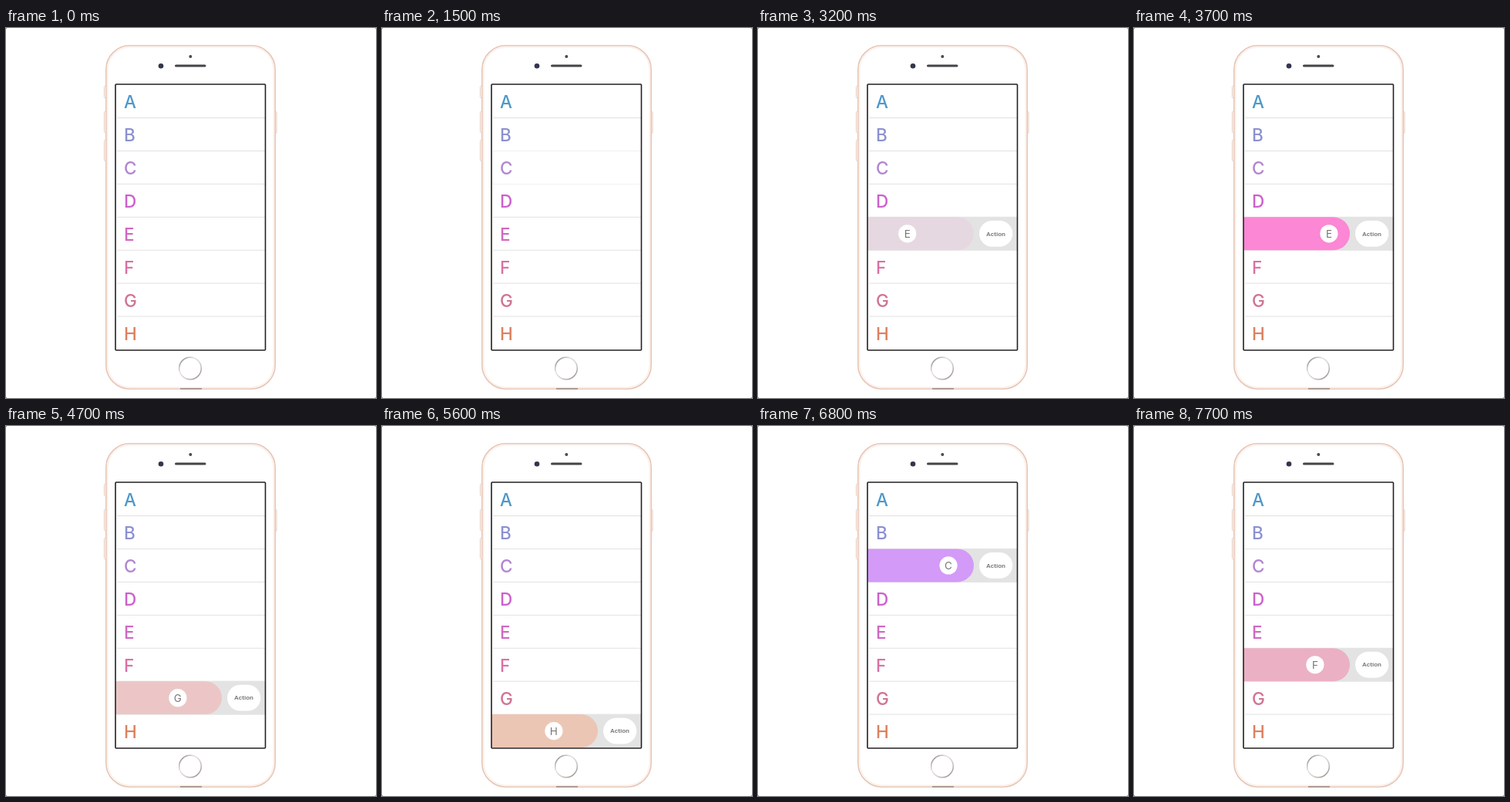
Recreate the animation shown at these times as an HTML page. Size 480x480 px, loop 7800 ms.

```html
<!DOCTYPE html>
<html lang="en">
<head>
<meta charset="utf-8">
<title>Swipe list</title>
<style>
  html, body { margin: 0; width: 100%; height: 100%; overflow: hidden; background: #fff; }
  svg { display: block; width: 100vw; height: 100vh; }
  .letter { font: 500 22.5px Inter, sans-serif; }
  .badge { font: 400 13.5px Inter, sans-serif; fill: #777; text-anchor: middle; }
  .action { font: 700 8px "Liberation Sans", Arial, sans-serif; fill: #777; text-anchor: middle; }
</style>
</head>
<body>
<svg viewBox="0 0 480 480">
  <defs>
    <clipPath id="screen"><rect x="142.5" y="73.5" width="193.5" height="344"/></clipPath>
    <linearGradient id="ring" x1="0" y1="0" x2="1" y2="1">
      <stop offset="0" stop-color="#77706d"/>
      <stop offset=".35" stop-color="#e6e0dd"/>
      <stop offset=".6" stop-color="#d9d2ce"/>
      <stop offset="1" stop-color="#8b8481"/>
    </linearGradient>
  </defs>

  <path d="M0 0h1v1h-1zM479 0h1v1h-1zM0 479h1v1h-1zM479 479h1v1h-1z" fill="#999"/>

  <!-- phone -->
  <g fill="#fff" stroke="#e6c6b7" stroke-width="1">
    <rect x="127.5" y="75.5" width="3" height="15" rx="1"/>
    <rect x="127.5" y="108.5" width="3" height="27" rx="1"/>
    <rect x="127.5" y="145.5" width="3" height="27" rx="1"/>
    <rect x="348" y="108.5" width="3" height="28" rx="1"/>
    <rect x="129.8" y="22.8" width="219.4" height="445.4" rx="31" stroke="#e8c5b4" stroke-width="1.6"/>
    <rect x="131.8" y="24.8" width="215.4" height="441.4" rx="29" stroke="#f7e8e0"/>
  </g>
  <rect x="226" y="467.2" width="28" height="1.8" fill="#a3938c"/>
  <circle cx="239.3" cy="37" r="2" fill="#4d4a4f"/>
  <circle cx="201" cy="49.3" r="3.3" fill="#33344f"/>
  <rect x="219" y="47.5" width="40.5" height="3" rx="1.5" fill="#454347"/>
  <circle cx="239" cy="441.5" r="14.3" fill="#fff" stroke="url(#ring)" stroke-width="1.5"/>

  <!-- list -->
  <g clip-path="url(#screen)">
    <g id="list"></g>
    <g id="swipes"></g>
  </g>
  <rect x="142" y="73" width="194.5" height="345" rx="1" fill="none" stroke="#242022" stroke-width="1.6"/>
</svg>
<script>
const LOOP = 7800, STEP = 100;
const TOP = 73.6, PITCH = 42.93, LEFT = 154, RIGHT = 336;
const OPEN = 1050, SLIDE = 350, CLOSE = 300;
const inks = ['#4f98ca', '#8b90d1', '#b186d0', '#cc60cc', '#d068c1', '#dc70a5', '#cf7591', '#dd805f'];

// row, start in ms, fill when fully open
const swipes = [
  [2, 1480, [206, 134, 254]],
  [4, 2796, [254, 124, 211]],
  [6, 4080, [249, 154, 154]],
  [7, 4980, [249, 154, 113]],
  [2, 5971, [206, 134, 254]],
  [5, 6985, [241, 139, 172]]
];

const byId = id => document.getElementById(id);
const nameOf = row => String.fromCharCode(65 + row);
const smooth = v => { v = Math.min(1, Math.max(0, v)); return v * v * (3 - 2 * v); };

function add(parent, tag, attrs, text) {
  const el = document.createElementNS('http://www.w3.org/2000/svg', tag);
  for (const key in attrs) el.setAttribute(key, attrs[key]);
  if (text) el.textContent = text;
  return parent.appendChild(el);
}

function letter(parent, row, x, y) {
  return add(parent, 'text', { class: 'letter', x, y, fill: inks[row] }, nameOf(row));
}

inks.forEach((ink, row) => {
  const y = TOP + row * PITCH;
  letter(byId('list'), row, LEFT - 1, y + 30.4);
  if (row) add(byId('list'), 'rect', { x: 144, y: y - .5, width: 192, height: 1, fill: '#e1e1e1' });
});

const layers = swipes.map(([row, start, rgb], i) => {
  const g = add(byId('swipes'), 'g', { transform: `translate(0 ${TOP + row * PITCH})` });
  add(g, 'rect', { x: 142, y: 0, width: 195, height: PITCH, fill: '#e3e3e3' });
  const action = add(g, 'g', {});
  add(action, 'rect', { x: 287, y: 4.6, width: 43.3, height: 33.8, rx: 16.9, fill: '#fff' });
  add(action, 'text', { class: 'action', x: 308.5, y: 24.2 }, 'Action');
  const pill = add(g, 'rect', { x: 100, y: 0, height: PITCH, rx: PITCH / 2 });
  const mark = add(g, 'g', {});
  const big = letter(mark, row, -9, 30.4);
  const badge = add(mark, 'g', {});
  add(badge, 'circle', { cx: 0, cy: 21.5, r: 11.6, fill: '#fff' });
  add(badge, 'text', { class: 'badge', x: 0, y: 26.4 }, nameOf(row));
  const end = i + 1 < swipes.length ? swipes[i + 1][1] - CLOSE / 2 : Infinity;
  return { g, action, pill, mark, big, badge, start, end, rgb };
});

function draw(time) {
  for (const s of layers) {
    const stay = 1 - smooth((time - s.end) / CLOSE);
    const slide = smooth((time - s.start) / SLIDE) * stay;
    const p = smooth((time - s.start) / OPEN) * stay;
    s.g.style.display = slide > 0 ? '' : 'none';
    if (slide <= 0) continue;
    const base = 255 - 28 * slide, tint = p * p;
    const fill = s.rgb.map(c => Math.round(base + (c - base) * tint));
    s.pill.setAttribute('fill', `rgb(${fill})`);
    s.pill.setAttribute('width', 258 - 78 * slide);
    s.action.setAttribute('transform', `translate(${56 * (1 - slide)} 0)`);
    s.mark.setAttribute('transform', `translate(${162 + 96 * p} 0)`);
    s.big.setAttribute('opacity', 1 - slide);
    s.badge.setAttribute('opacity', slide);
  }
}

const origin = performance.now();
function tick() {
  const time = (performance.now() - origin) % LOOP;
  draw(Math.floor(time / STEP) * STEP);
  requestAnimationFrame(tick);
}
tick();
</script>
</body>
</html>
```
